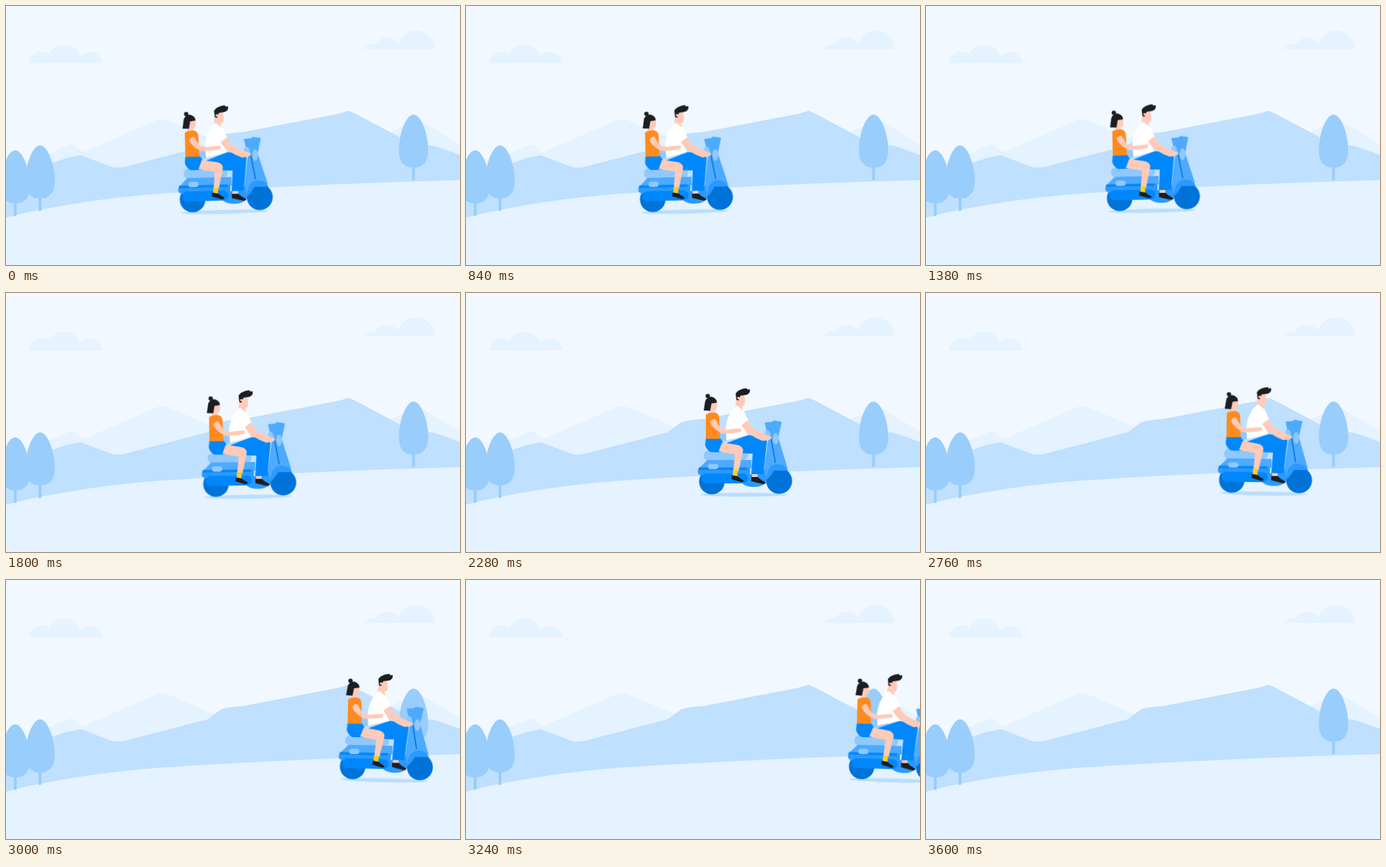
An HTML page without scripts that plays this animation: 640 px wide and 366 px high, repeating every 4500 ms.

```html
<!DOCTYPE html>
<html lang="en">
<head>
<meta charset="utf-8">
<title>Scooter ride</title>
<style>
  html, body { margin: 0; width: 100%; height: 100%; overflow: hidden; background: #f2f8ff; }
  svg { display: block; width: 640px; height: 366px; }

  .pale { fill: #e5f2ff; }
  .hill { fill: #bfe0fe; }
  .tree { fill: #99cdfb; }
  .soft { fill: #90c8fd; }
  .light { fill: #4daaff; }
  .panel { fill: #2b99ff; }
  .blue { fill: #0087fc; }
  .wheel { fill: #0073d9; }
  .skin { fill: #ffcab8; }
  .dark { fill: #1c1e22; }

  .ride { animation: ride 4500ms infinite; }
  .tilt { transform-origin: 346.5px 267px; animation: tilt 4500ms linear infinite; }

  /* Accelerates away, leaves the stage, then the scene stays empty. */
  @keyframes ride {
    0% { transform: translateX(-83.5px); }
    16% { transform: translateX(-83.5px); animation-timing-function: cubic-bezier(.3333, 0, .6667, .0963); }
    80%, 100% { transform: translateX(338.7px); }
  }
  /* Follows the slope of the ground. */
  @keyframes tilt {
    0% { transform: translateY(7px) rotate(-1.5deg); }
    18.67% { transform: translateY(6.7px) rotate(-1.45deg); }
    30% { transform: translateY(5.4px) rotate(-1.2deg); }
    40% { transform: translateY(3.5px) rotate(-.8deg); }
    50.67% { transform: translateY(0) rotate(0deg); }
    61.33% { transform: translateY(-2.3px) rotate(.85deg); }
    66.67% { transform: translateY(-3px) rotate(1.3deg); }
    80%, 100% { transform: translateY(-3px) rotate(2deg); }
  }
</style>
</head>
<body>
<svg viewBox="0 0 640 366" xmlns="http://www.w3.org/2000/svg">
  <defs>
    <g id="tree" class="tree">
      <path d="M0 0C11 0 20.7 28 20.7 50C20.7 67 13 75 0 75S-20.7 67-20.7 50C-20.7 28-11 0 0 0Z"/>
      <path d="M-2 70H2V92L-2 93Z"/>
    </g>
  </defs>

  <rect width="640" height="366" fill="#f2f8ff"/>

  <g class="pale">
    <path d="M33 81A17 17 0 0 1 61 68A23 23 0 0 1 104 71A18 17 0 0 1 136 81Z"/>
    <path d="M504 61Q511 53 521 54A19 19 0 0 1 553 53A26 25 0 0 1 604 61Z"/>
    <path d="M30 221L89 196.500Q93 195 97 197L108 207L211 162Q220 158 229 162L310 196V240H30Z"/>
    <path d="M530 184L573 164Q580 160 588 164L640 196V230H530Z"/>
  </g>
  <path class="hill" d="M0 243L69 220.500L86 214.500L106 211L148 227Q157 230 168 227L284 197L303 183Q310 180 322 179L335 178L470 152L483 148L492 152L554 185Q572 198 581 198L600 197L608 199L640 210.500V366H0Z"/>
  <path class="pale" d="M0 299C70 281 150 270 220 265S480 250 640 246V366H0Z"/>
  <use href="#tree" x="13" y="204"/>
  <use href="#tree" x="48" y="197"/>
  <use href="#tree" x="574.500" y="153.500"/>

  <g class="ride"><g class="tilt">
    <ellipse cx="391" cy="285" rx="61.500" ry="2.800" fill="#b9ddfd"/>

    <!-- Scooter -->
    <circle class="wheel" cx="346.500" cy="266.500" r="18"/>
    <path class="light" d="M421 183L432 182L433 180L445 182L440 204L453 247L424 264Q423 274 404 274Q390 273 388 262L420 250L426 206Z"/>
    <path class="panel" d="M388 260L421 250L423 264Q420 274 405 274Q392 274 388 267Z"/>
    <rect class="soft" x="335" y="222.500" width="62" height="14.500" rx="7.200"/>
    <path class="light" d="M340 236H402V248H328Z"/>
    <path class="panel" d="M328 247H400V258H331Q324 256 328 247Z"/>
    <path class="blue" d="M328 246.500H396V250H328Z"/>
    <rect class="blue" x="332" y="255" width="65" height="14" rx="7"/>
    <rect class="soft" x="341" y="241.500" width="14.500" height="7.500" rx="3.700"/>
    <circle class="wheel" cx="441.300" cy="265.500" r="18.300"/>
    <path class="panel" d="M423 265Q424 243 438 242Q450 242 454 251L434 251Q429 260 423 265Z"/>
    <path d="M430 206L436 240" fill="none" stroke="#0073d9" stroke-width="1.500"/>
    <ellipse class="soft" cx="436.300" cy="206" rx="4" ry="8.200"/>
    <path class="soft" d="M421 196Q426 191 428 197L430 204H421Z"/>

    <!-- Driver -->
    <path class="skin" d="M403 254H411V263H403Z"/>
    <path class="dark" d="M402 260L411 260Q416 265 422 267.500Q423 270 418 270L402 266Z"/>
    <path class="blue" d="M367 212L397 201Q425 203 424 211L419 256H402L404 227Q384 228 366 218Z"/>
    <path class="skin" d="M381 143H392L393.500 153Q393 160 389 160L391 169H379Z"/>
    <path fill="#fff" d="M376 164L382 159Q389 165 392 167L398 181L390 188L397 201L367 208L366 190Q368 174 376 164Z"/>
    <path class="skin" d="M388 187L397 180Q402 190 409 194L424 201L430 203.500Q432 207 425 208L418 209Q397 201 388 187Z"/>
    <path class="dark" d="M380 142Q383 136 395 134.500L397 136.500L400 136Q401 142 395 144L387 145Q385 148 384 152L381 151Z"/>
    <circle class="skin" cx="384" cy="148.500" r="1.800"/>

    <!-- Passenger -->
    <path class="soft" d="M357 199L366 197L367 209H358Z"/>
    <path class="blue" d="M338 205H358L366 216L360 225H345Q339 222 337 215Z"/>
    <path class="skin" d="M361 211L384 215Q392 218 390 225L384 252H376.500L379 228L356 224Z"/>
    <path d="M376.500 250H383L382.500 260H375.500Z" fill="#ffd014"/>
    <path class="dark" d="M374.500 257.500L383 259Q387 263 391 264.500Q392 267.500 387 267L374 263Z"/>
    <path class="skin" d="M343 153H353.500L354 161Q353 166 349.500 166L351 172H342Z"/>
    <path d="M338 172Q340 169 351 169Q357 171 357 177L358 206H338Z" fill="#ff8b1f"/>
    <path class="skin" d="M344 183Q346 178 351 178L358 190L367 193L382 191.500L388 191.500V196L381 197.500L363 199Q349 194 344 183Z"/>
    <circle class="dark" cx="340.700" cy="145.500" r="3.100"/>
    <path class="dark" d="M335 166L337 153Q339 147 346 146.500Q354 149 353.500 155L346 156L344 166.500Z"/>
  </g></g>
</svg>
</body>
</html>
```
